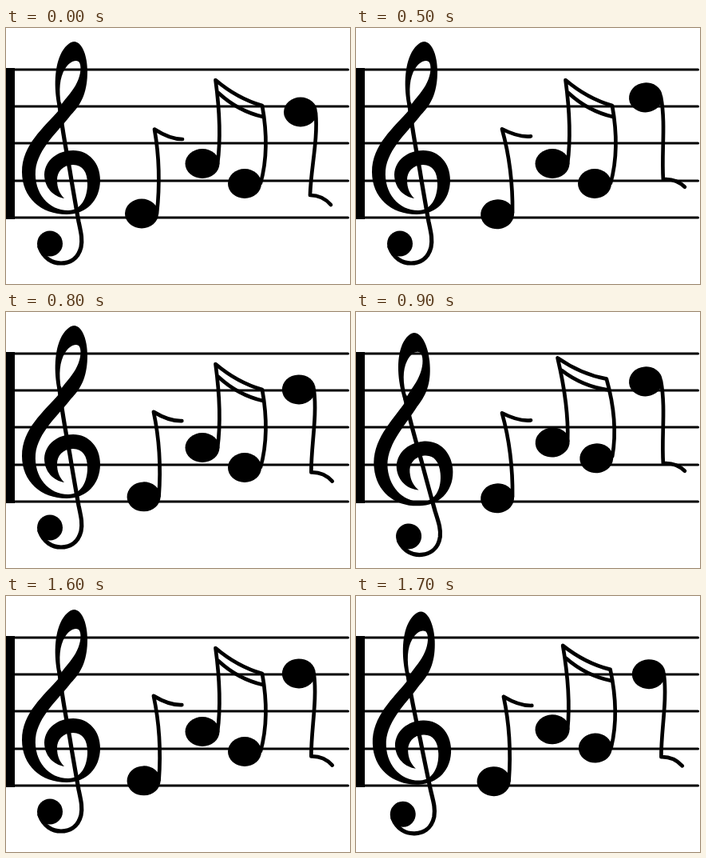
An HTML page that plays this animation: 431 px wide and 320 px high, repeating every 1900 ms.

```html
<!DOCTYPE html>
<html lang="en">
<head>
<meta charset="utf-8">
<title>Swaying notes</title>
<style>
  html, body { margin: 0; width: 100%; height: 100%; overflow: hidden; background: #fff; }
  svg { display: block; width: 100%; height: 100%; }
  .line { fill: none; stroke: #000; stroke-width: 4.7; stroke-linecap: round; stroke-linejoin: round; }
  .staff { stroke-width: 3.2; }
  .stem { stroke-width: 5.2; }

  /* --t: sway from rest (0) to full tilt (1), --y: extra drop */
  .part {
    --t: 0; --y: 0px;
    transform: translateY(calc(var(--t) * var(--lift) + var(--y))) rotate(calc(var(--t) * -5.5deg));
    animation: 1900ms step-end infinite;
  }
  .clef { --lift: 9.5px;  transform-origin: 75px 155px;  animation-name: late; }
  .pair { --lift: -6.5px; transform-origin: 246px 168px; animation-name: late; }
  .low  { --lift: 0px;    transform-origin: 182px 158px; animation-name: early; }
  .high { --lift: -19px;  transform-origin: 375px 168px; animation-name: early; }

  @keyframes late {
    0%, 100%         { --t: 0;   --y: 0px; }
    31.579%, 73.684% { --t: 0;   --y: 2.5px; }
    42.105%, 84.211% { --t: 0;   --y: 0px; }
    47.368%          { --t: 1;   --y: 0px; }
    89.474%          { --t: .34; --y: -.5px; }
  }
  @keyframes early {
    0%, 100%         { --t: 0;   --y: 0px; }
    26.316%, 47.368% { --t: 1;   --y: 0px; }
    31.579%, 73.684% { --t: 0;   --y: 2.5px; }
    42.105%, 84.211% { --t: .36; --y: -1.5px; }
    89.474%          { --t: .36; --y: -.7px; }
  }
</style>
</head>
<body>
<svg viewBox="0 0 431 320" preserveAspectRatio="none">
  <rect y="50" width="11" height="189"/>
  <path class="line staff" d="M9 52H428.500M9 98H428.500M9 144H428.500M9 191H428.500M9 237H428.500"/>

  <g class="part clef">
    <path fill-rule="evenodd" d="M66 103C60 80 60 52 68 34C73 23 80 17 86 17C96 18 102 36 102 54
      C102 78 96 94 81 109C66 129 40 150 37 178C35 206 53 228 78 228C94 228 102 212 102 195
      C102 180 96 171 84 171C71 171 64 180 64 190C64 200 67 207 73 213C60 211 48 200 48 183
      C49 165 65 153 84 153C104 153 118 169 118 190C118 216 100 233 76 233
      C44 233 20 212 20 180C20 146 48 124 66 103Z
      M69 96C66 78 67 62 74 51C79 43 86 39 91 42C95 46 94 58 89 68C84 79 76 86 69 96Z"/>
    <path class="line stem" d="M67 95C69 120 75 150 80 178C84 203 88 225 91 242C94 256 96 264 94 274C90 290 78 294 69 294C58 294 47 288 42 274"/>
    <circle cx="55" cy="269.500" r="16"/>
  </g>

  <g class="part low">
    <ellipse cx="170" cy="232" rx="21" ry="18.500"/>
    <path class="line" d="M189 232C193 195 192 160 186 126.500C196 133 209 139 221 139"/>
  </g>

  <g class="part pair">
    <ellipse cx="246" cy="169.500" rx="21.500" ry="18.500"/>
    <ellipse cx="299" cy="194.500" rx="21" ry="18.500"/>
    <path class="line" d="M265 170C269 140 268 105 262.500 65C279 79 300 91 321 97C327 130 327 165 319 194"/>
    <path class="line" d="M266 81C280 94 300 106 322 111"/>
  </g>

  <g class="part high">
    <ellipse cx="369" cy="105" rx="21" ry="18.500"/>
    <path class="line" d="M388 106C391 140 382 175 381 209C392 209 400 213 407 221"/>
  </g>
</svg>
</body>
</html>
```
